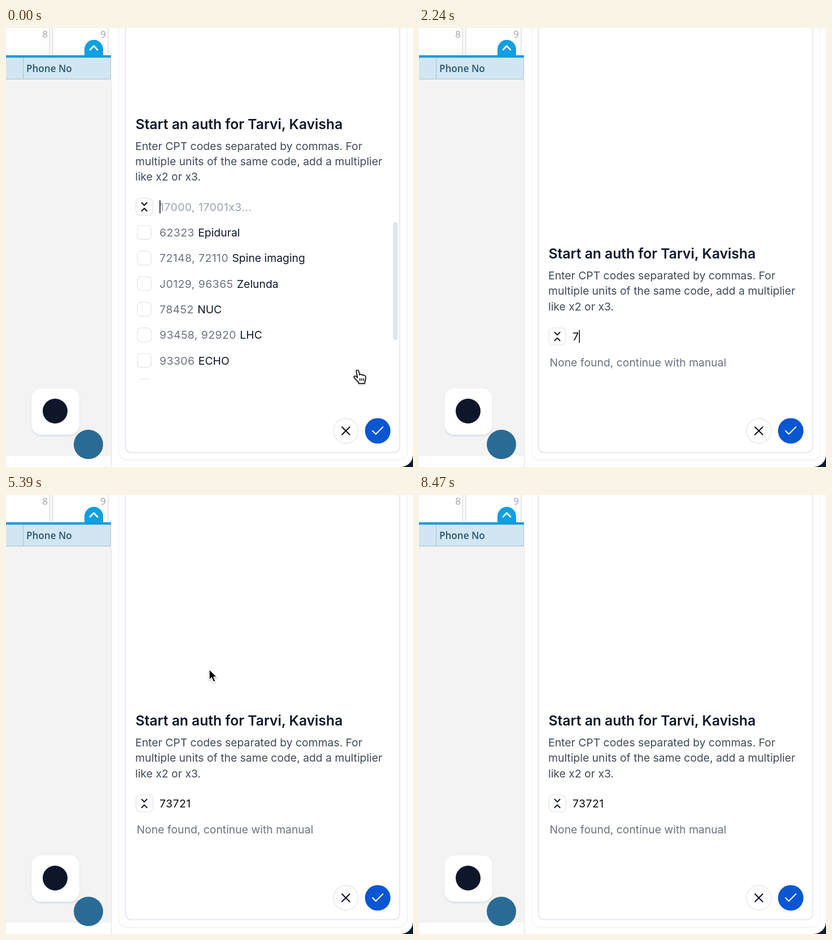
An HTML page for the animation above (8610 ms loop, 721 by 777 pixels).

```html
<!DOCTYPE html>
<html lang="en">
<head>
<meta charset="utf-8">
<title>Start an auth</title>
<style>
  html, body { margin: 0; width: 100%; height: 100%; overflow: hidden; background: #fefefe; }
  svg { display: block; }
  text { font: 19.35px Inter, sans-serif; font-optical-sizing: none; fill: #414a59; white-space: pre; }
  .title { font-size: 24.65px; font-weight: 600; fill: #0f172a; }
  .note { fill: #6b7280; }
  .code { fill: #6b7280; letter-spacing: .025em; }
  .label { fill: #0f172a; letter-spacing: 0; }
  .hint { fill: #9aa3b2; letter-spacing: .025em; }
  .typed { fill: #0a0a0a; letter-spacing: .025em; }
  .tick { font: 17px "Open Sans", sans-serif; fill: #a0a0a0; text-anchor: middle; }
  .column { font: 600 17.1px "Open Sans", sans-serif; fill: #2b5674; }
  .line { fill: none; stroke-linecap: round; stroke-linejoin: round; }
  .box { fill: #fff; stroke: #e3e7ed; stroke-width: 1.4; }
</style>
</head>
<body>
<svg width="721" height="777" viewBox="0 0 721 777">
  <defs>
    <clipPath id="listClip"><rect x="212" y="335" width="460" height="287.5"/></clipPath>
    <filter id="soft" x="-20%" y="-20%" width="140%" height="140%">
      <feDropShadow dx="0" dy="2" stdDeviation="1.5" flood-color="#9fb2d8" flood-opacity=".4"/>
    </filter>
    <filter id="drop" x="-50%" y="-50%" width="200%" height="200%">
      <feDropShadow dx="0" dy="1.5" stdDeviation="1.2" flood-opacity=".3"/>
    </filter>
  </defs>

  <!-- page behind the panel -->
  <rect y="91" width="185" height="666" fill="#f3f3f3"/>
  <path d="M77.5 0V47M82.5 0V47M181 0V47" stroke="#cfcfcf"/>
  <text class="tick" x="69" y="16.5">8</text>
  <text class="tick" x="172" y="16.5">9</text>
  <path d="M139 49V38A16.5 17 0 0 1 172 38V49Z" fill="#109fe2"/>
  <path class="line" d="M149 38.5L155.5 31.8L162 38.5" stroke="#fff" stroke-width="2.8"/>
  <rect y="52" width="185" height="38" fill="#d1e6f2"/>
  <rect y="48.2" width="186" height="4.3" fill="#189bd7"/>
  <path d="M0 90.5H185.5V52.5M30.5 52.5V90" fill="none" stroke="#a9c0cf"/>
  <text class="column" x="36" y="78">Phone No</text>
  <path d="M186.5 91V777" stroke="#dedede"/>
  <rect x="45" y="638" width="85" height="82" rx="18" fill="#fff" filter="url(#soft)"/>
  <circle cx="87" cy="678" r="22" fill="#0e1629"/>
  <circle cx="146" cy="737" r="26" fill="#2a6b95"/>

  <!-- panel -->
  <path d="M199.5 0V748Q199.5 765 217 765H694Q711 765 711 748V0" fill="none" stroke="#f1f2f6" stroke-width="1.5"/>
  <path d="M211.5 0V739Q211.5 751.5 224 751.5H685Q697.5 751.5 697.5 739V0" fill="#fff" stroke="#e6e9f2" stroke-width="2.2"/>
  <path d="M721 777H699A22 22 0 0 0 721 755Z" fill="#0c1c2a"/>

  <g id="form">
    <text class="title" x="229.5" y="179">Start an auth for Tarvi, Kavisha</text>
    <text x="229" y="216">Enter CPT codes separated by commas. For</text>
    <text x="229" y="243">multiple units of the same code, add a multiplier</text>
    <text x="229" y="270.4">like x2 or x3.</text>
    <rect class="box" x="230.2" y="301.5" width="30" height="30" rx="8"/>
    <path class="line" d="M240.4 309.2l4.6 4.6l4.6 -4.6M240.4 323.8l4.6 -4.6l4.6 4.6" stroke="#0a0f1c" stroke-width="2"/>
    <text id="hint" class="hint" x="272" y="323.5">17000, 17001x3...</text>
    <text id="typed" class="typed" x="272" y="323.5"></text>
    <rect id="caret" y="305" width="1.5" height="23" fill="#000"/>
  </g>

  <g id="list">
    <g id="rows" clip-path="url(#listClip)"></g>
    <rect x="685.5" y="343.5" width="8.5" height="209" rx="4.2" fill="#e0e5ed"/>
  </g>
  <text id="none" class="note" x="231.5" y="598.5">None found, continue with manual</text>

  <circle cx="602" cy="713" r="22" class="box"/>
  <path class="line" d="M595.2 706.2l13.6 13.6m0 -13.6l-13.6 13.6" stroke="#0a0f1c" stroke-width="2"/>
  <circle cx="658.5" cy="713" r="22.6" fill="#0956d2"/>
  <path class="line" d="M667.6 706.2l-12.5 12.5l-5.7 -5.7" stroke="#fff" stroke-width="2.1"/>

  <g id="cursor" filter="url(#drop)">
    <path id="hand" fill="#fff" stroke="#000" stroke-width="1.5" stroke-linejoin="round"
      d="M-2 2C-2 -.7 2 -.7 2.4 2L3.8 8.5C5 6.6 7.4 7 7.8 9C9.3 7.5 11.3 8.2 11.6 10C13.2 9.2 14.8 10.3 14.8 12.5C14.8 16 14.6 18 13 20.5V23.5H2.2V21.5C-1 18.6 -3.5 15.5 -6.2 12.6C-6.6 10.4 -3.6 9.8 -1.8 11.5L.3 13.4ZM4.5 14.5V19M7.8 14.5V19M11 14.5V19"/>
    <g id="beam" class="line">
      <path d="M-5 -11.5Q-.7 -11.5 0 -8.5Q.7 -11.5 5 -11.5M0 -9V9M-5 11.5Q-.7 11.5 0 8.5Q.7 11.5 5 11.5M-3 4.5H3" stroke="#fff" stroke-width="3.6"/>
      <path d="M-5 -11.5Q-.7 -11.5 0 -8.5Q.7 -11.5 5 -11.5M0 -9V9M-5 11.5Q-.7 11.5 0 8.5Q.7 11.5 5 11.5M-3 4.5H3" stroke="#000" stroke-width="1.7"/>
    </g>
    <path id="arrow" d="M-.5 -.5V18.3L3.8 14.4L7 21.8L10.5 20.3L7.3 13.1H13Z" stroke="#fff" stroke-width="1.3"/>
  </g>
</svg>

<script>
const LOOP = 8610, STEP = 70, SHIFT = 229.4;
const $ = id => document.getElementById(id);
const show = (id, on) => { $(id).style.display = on ? '' : 'none'; };

const rows = [
  ['62323', 'Epidural'],
  ['72148, 72110', 'Spine imaging'],
  ['J0129, 96365', 'Zelunda'],
  ['78452', 'NUC'],
  ['93458, 92920', 'LHC'],
  ['93306', 'ECHO'],
  ['', '']
];
$('rows').innerHTML = rows.map(([code, label], i) => {
  const y = 361.8 + i * 45.35;
  return `<rect class="box" x="232.6" y="${y - 12.4}" width="24.8" height="24.8" rx="7"/>
    <text class="code" x="272" y="${y + 7}">${code}<tspan class="label" dx="6.3">${label}</tspan></text>`;
}).join('');

// key presses, caret toggles, and pointer path as [time, x, y, easing into the key]
const keys = [[2240, '7'], [2730, '73'], [2940, '737'], [3150, '7372'], [3500, '73721']];
const blinks = [0, 70, 560, 1050, 1610, 2170, 2240, 4060, 4550, 5110, 5600, 6160, 6650, 7210, 7700, 8260];
const ease = {
  in: p => p * p,
  out: p => p * (2 - p),
  both: p => p * p * (3 - 2 * p)
};
const path = [
  [0, 622.5, 605.5], [630, 360.5, 309, 'both'],
  [5390, 360.5, 309, 'both'], [5810, 625, 535, 'in'], [6090, 677, 729, 'out'],
  [6230, 677, 729, 'both'], [6580, 372, -40, 'both']
];

function pointer(t) {
  const i = path.findIndex(k => k[0] > t);
  if (i < 0) return path[path.length - 1].slice(1, 3);
  const [t0, x0, y0] = path[i - 1], [t1, x1, y1, kind] = path[i];
  const p = ease[kind]((t - t0) / (t1 - t0));
  return [x0 + (x1 - x0) * p, y0 + (y1 - y0) * p];
}

let last = null;
function draw(t) {
  const pressed = keys.filter(k => k[0] <= t).pop();
  const value = pressed ? pressed[1] : '';
  if (value !== last) {
    last = value;
    $('typed').textContent = value;
    show('hint', !value);
    show('list', !value);
    show('none', value);
    $('form').setAttribute('transform', `translate(0 ${value ? SHIFT : 0})`);
  }
  const width = value ? $('typed').getComputedTextLength() : 0;
  $('caret').setAttribute('x', 272 + width);
  show('caret', blinks.filter(b => b <= t).length % 2);

  const [x, y] = pointer(t);
  const early = t < 2240;
  show('cursor', early || (t >= 5250 && t < 6580));
  show('hand', early && y > 339);
  show('beam', early && y <= 339);
  show('arrow', !early);
  $('cursor').setAttribute('transform', `translate(${x} ${y})`);
}

let start;
function tick(now) {
  start ??= now;
  draw(Math.floor(((now - start) % LOOP) / STEP) * STEP);
  requestAnimationFrame(tick);
}
draw(0);
requestAnimationFrame(tick);
</script>
</body>
</html>
```
